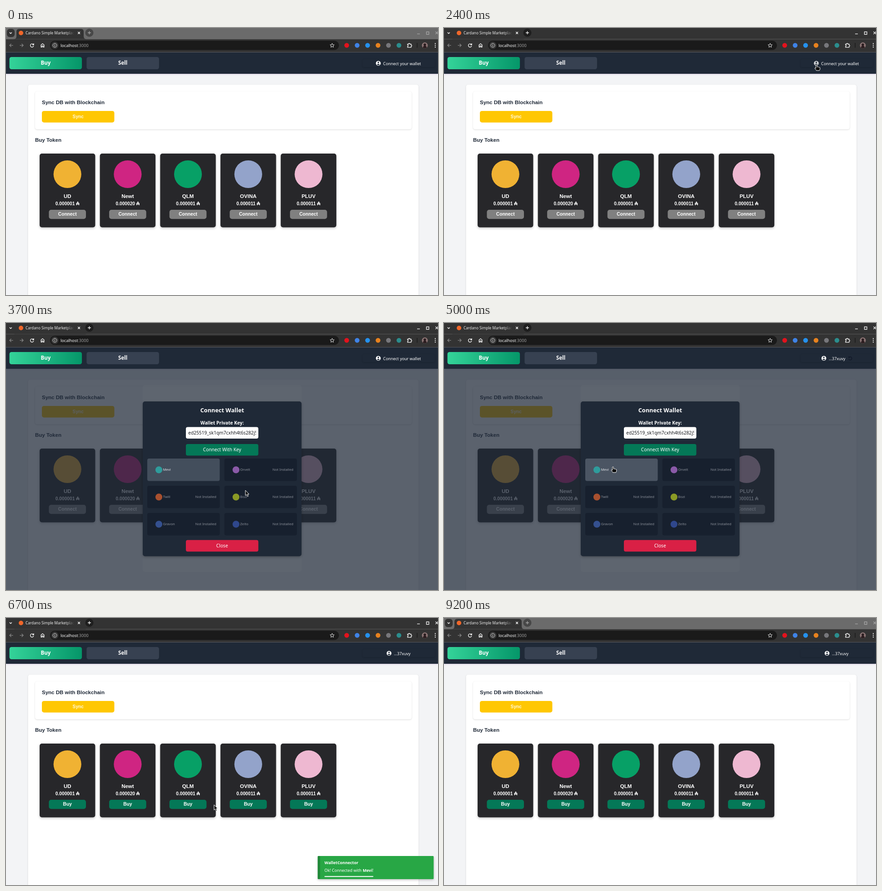
An HTML page that plays this animation: 951x589 px, repeating every 9.6 s.

```html
<!DOCTYPE html>
<html lang="en">
<head>
<meta charset="utf-8">
<title>Simple Marketplace</title>
<style>
  html, body { margin: 0; width: 100%; height: 100%; overflow: hidden; background: #f3f4f6; }
  svg { display: block; width: 951px; height: 589px; }
  text { white-space: pre; }
  .noto { font-family: "Noto Sans", "Open Sans", sans-serif; }
  .lib { font-family: "Liberation Sans", Arial, "DejaVu Sans", sans-serif; font-weight: 700; }
  .soft { filter: drop-shadow(0 1px 1.5px rgba(0, 0, 0, .14)); }
  .deep { filter: drop-shadow(0 2px 2.5px rgba(0, 0, 0, .24)); }
  .line { fill: none; stroke-width: 1.3; }
</style>
</head>
<body>
<svg id="stage" viewBox="0 0 951 589" xmlns="http://www.w3.org/2000/svg"></svg>
<script>
const LOOP = 9600, STEP = 100;
const WHITE = '#fff', NAVY = '#1f2937', GREEN = '#047857';

// ---- drawing helpers ----
const rect = (x, y, w, h, fill, r = 0, extra = '') =>
  `<rect x="${x}" y="${y}" width="${w}" height="${h}" rx="${r}" fill="${fill}" ${extra}/>`;
const disc = (x, y, r, fill, extra = '') =>
  `<circle cx="${x}" cy="${y}" r="${r}" fill="${fill}" ${extra}/>`;
const line = (d, color = WHITE, extra = '') =>
  `<path class="line" d="${d}" stroke="${color}" ${extra}/>`;
const group = (id, body, extra = '') => `<g id="${id}" ${extra}>${body}</g>`;

// y is the middle of the capital letters
const text = (str, x, y, size, { font = 'noto', weight = 400, fill = WHITE, at = 'middle', extra = '' } = {}) =>
  `<text class="${font}" x="${x}" y="${(y + size * .36).toFixed(2)}" font-size="${size}" fill="${fill}"
    ${font === 'noto' ? `font-weight="${weight}"` : ''} text-anchor="${at}" ${extra}>${str}</text>`;
const lib = (str, x, y, size, fill = WHITE, at = 'middle') => text(str, x, y, size, { font: 'lib', fill, at });
const button = (label, x, y, w, h, fill, weight = 400) =>
  rect(x, y, w, h, fill, 4) + text(label, x + w / 2, y + h / 2, 10.2, { weight });

// ---- browser frame ----
function strip(id, { bg, tab, knob, plus, ink }) {
  return group(id,
    rect(0, 0, 951, 24.5, bg) +
    `<path d="M17 24.5Q23 24.5 23 18V8Q23 2 29 2H165Q171 2 171 8V18Q171 24.5 177 24.5Z" fill="${tab}"/>` +
    rect(2, 2, 17, 18, knob, 6) +
    line('M7.8 9.8L10.3 12.3L12.8 9.8', WHITE) +
    disc(183.5, 10.5, 9, plus) +
    line('M180 10.5H187M183.5 7V14', ink) +
    line('M905 13H911', ink) +
    line('M925.5 8.5H931V14H925.5Z', ink) +
    line('M945.5 8L951 13.5M951 8L945.5 13.5', ink));
}

function browser() {
  const marks = [[750, '#e3121d'], [773, '#3f83e6'], [796, '#2591ee'], [819, '#e8821e'], [842, '#77777b'], [865, '#2b8d8d']];
  return strip('idle', { bg: '#6b6b6b', tab: '#333', knob: '#333', plus: '#474747', ink: '#a5a5a5' }) +
    strip('focus', { bg: '#333', tab: '#333', knob: '#333', plus: '#1e1e1e', ink: '#f2f2f2' }) +
    disc(33, 11, 5, '#f0672a') +
    text('Cardano Simple Marketplace', 43, 11, 8.25, { fill: 'url(#fade)', at: 'start' }) +
    line('M158.3 8.5L163 13.2M163 8.5L158.3 13.2') +
    rect(0, 24.4, 951, 29, '#333') +
    rect(97, 28, 636, 20.5, '#1a1a1a', 10.25) +
    line('M15.5 38.3H8M11.5 34.8L8 38.3L11.5 41.8', '#858585') +
    line('M30.5 38.3H38M34.5 34.8L38 38.3L34.5 41.8', '#858585') +
    line('M60.2 36.2A3.7 3.7 0 1 0 60.9 39.4M61 34V37H58') +
    line('M77.2 42V37.3L80.5 34.6L83.8 37.3V42H81.6V39.4H79.4V42Z') +
    disc(107.5, 38.3, 8, '#383838') +
    line('M107.5 34A4.3 4.3 0 1 0 107.51 34M107.5 37.6V40.7M107.5 35.6V36.7', '#e6e6e6', 'style="stroke-width:1"') +
    text('localhost<tspan fill="#a0a0a0">:3000</tspan>', 120, 38.3, 9.1, { at: 'start' }) +
    line('M718 33.8L719.3 36.9L722.6 37.1L720.1 39.3L720.9 42.5L718 40.8L715.1 42.5L715.9 39.3L713.4 37.1L716.7 36.9Z', '#e6e6e6', 'style="stroke-width:1"') +
    marks.map(([x, c]) => disc(x, 38.3, 5.2, c)).join('') +
    line('M884 35.5H886.3A1.5 1.5 0 0 1 889.3 35.5H891.8V37.6A1.5 1.5 0 0 1 891.8 40.6V42.7H884V40.6A1.5 1.5 0 0 0 884 37.6Z') +
    rect(904.6, 33, 1, 10.5, '#111') +
    disc(922, 38.3, 6.5, '#8b7474') +
    `<path d="M918 43.4Q918 40 920.5 39.3A2.9 2.9 0 1 1 923.5 39.3Q926 40 926 43.4Q922 46 918 43.4Z" fill="#2b1d20"/>` +
    [34.4, 38.3, 42.2].map(y => disc(945, y, 1.1, WHITE)).join('');
}

// ---- page ----
function card([name, price, color], i) {
  const x = 74 + i * 132.7, mid = x + 61.2;
  const action = (cls, label, fill) =>
    `<g class="${cls}">${rect(x + 20.4, 401, 81.6, 20.2, fill, 5)}${lib(label, mid, 410.7, 10.2)}</g>`;
  return rect(x, 277, 122.4, 162.8, '#27272a', 5, 'class="deep"') +
    disc(mid, 322.5, 30.6, color) +
    lib(name, mid, 371.2, 11.5) +
    lib(price + ' ₳', mid, 387.5, 10.2) +
    action('before', 'Connect', '#808080') +
    action('after', 'Buy', GREEN);
}

function page() {
  const tokens = [
    ['UD', '0.000001', '#f0b233'],
    ['Newt', '0.000020', '#cf2582'],
    ['QLM', '0.000001', '#07a066'],
    ['OVINA', '0.000011', '#93a3ca'],
    ['PLUV', '0.000011', '#eeb8d1'],
  ];
  return rect(0, 53, 951, 536, '#f3f4f6') +
    rect(48.5, 125, 859.7, 480, WHITE, 5, 'class="soft"') +
    rect(64, 140, 829, 83.6, WHITE, 5, 'class="soft"') +
    lib('Sync DB with Blockchain', 79, 163.5, 11.5, NAVY, 'start') +
    rect(79, 183, 159.5, 25.4, '#ffc702', 4.5) +
    lib('Sync', 158.8, 195.5, 10.2, '#fff8dc') +
    lib('Buy Token', 64, 247, 11.5, NAVY, 'start') +
    tokens.map(card).join('');
}

const person = x => disc(x, 77.8, 5.3, WHITE) + disc(x, 76, 1.7, NAVY) +
  `<path d="M${x - 3.2} 80.6Q${x} 77.6 ${x + 3.2} 80.6Q${x} 83.6 ${x - 3.2} 80.6Z" fill="${NAVY}"/>`;

function account(id, x, label, tail = '') {
  return group(id, `<g class="person">${person(x)}</g>` +
    text(label, x + 10.7, 78.6, 8.925, { weight: 500, at: 'start' }) + tail);
}

function nav() {
  return rect(0, 53.4, 951, 47.6, NAVY, 0, 'style="filter:drop-shadow(0 1px 1.5px rgba(110,60,140,.25))"') +
    rect(7.6, 64, 159.5, 27, 'url(#mint)', 4.5) +
    text('Buy', 87.4, 77.3, 11.5, { weight: 600 }) +
    rect(177.4, 64, 159.5, 27, '#374151', 4.5) +
    text('Sell', 257.2, 77.3, 11.5, { weight: 600 }) +
    rect(785, 69, 159, 17.5, NAVY, 4, 'class="soft"') +
    account('guest', 819.6, 'Connect your wallet') +
    account('joining', 836.2, '...37xuvy', line('M892.3 75A3.6 3.6 0 1 1 890.8 79.5M891 73.5V76.2H893.6', '#111827')) +
    account('member', 843.2, '...37xuvy');
}

// ---- dialogs ----
function picker() {
  const wallets = [
    ['Mevi', '#2f9c9c'], ['Orvelt', '#8a5aa8'], ['Twill', '#a8502f'],
    ['Bozi', '#8a9a25'], ['Gravon', '#34508f'], ['Zelto', '#2f478c'],
  ];
  const tile = ([name, color], i) => {
    const x = i % 2 ? 480.8 : 311, y = 299 + (i >> 1) * 60;
    return rect(x, y, 159.5, 49.6, i ? '#17202e' : '#434e5c', 4, i ? '' : 'id="first"') +
      disc(x + 25.5, y + 24.8, 7.6, color) +
      text(name, x + 34.7, y + 24.6, 7.65, { at: 'start', fill: i ? '#8b909a' : '#e3e6ea' }) +
      (i ? text('Not Installed', x + 152, y + 24.6, 7.65, { at: 'end', fill: '#8b909a' }) : '');
  };
  return group('picker',
    rect(301, 137, 350, 412, 'rgba(255,255,255,.02)', 5, 'class="soft"') +
    rect(301, 173, 349.6, 341.4, NAVY, 5, 'class="deep"') +
    text('Connect Wallet', 475.8, 192.4, 12.75, { weight: 700 }) +
    text('Wallet Private Key:', 475.8, 220, 10.2, { weight: 700 }) +
    rect(396, 229.5, 159.5, 25.5, WHITE, 4) +
    text('ed25519_sk1qm7cxhh4t6s282j5vw', 401.2, 242.3, 10.2, { fill: '#16181d', at: 'start', extra: 'clip-path="url(#field)"' }) +
    button('Connect With Key', 396, 267, 159.5, 25.6, GREEN, 500) +
    wallets.map(tile).join('') +
    button('Close', 396, 478.8, 159.5, 25.4, '#d92045'));
}

function menu() {
  const rows = [['View Balance', 475.8], ['Api Key', 475.8], ['Disconnect Wallet', 468]];
  return group('menu',
    rect(386, 225, 180, 205, 'rgba(255,255,255,.02)', 5, 'class="soft"') +
    rect(386, 240, 179.6, 190, NAVY, 5, 'class="deep"') +
    text('YOUR WALLET [mevi]', 475.8, 260, 12.75, { weight: 700 }) +
    rows.map(([label, x], i) => rect(396, 273.5 + i * 40, 159.5, 30, '#2d3748', 4) +
      text(label, x, 288.5 + i * 40.2, 10.2, { weight: 700 })).join('') +
    line('M519 365V363.5L527 361.3L528.5 362.5V369.5H524.5M520.5 364.6H528.5M525.5 366.8H528', WHITE, 'style="stroke-width:1"') +
    line('M519.5 366.8A2.7 2.7 0 1 0 519.51 366.8M518 369.5H521', WHITE, 'style="stroke-width:1"') +
    rect(396, 394, 159.5, 25.5, '#d92045', 4, 'id="close"') +
    text('Close', 475.8, 406.8, 10.2));
}

function toast() {
  return `<svg id="toast" x="680" width="271" viewBox="0 0 271 61" preserveAspectRatio="xMidYMin slice">` +
    rect(6.4, 0, 255, 51, '#28a745', 1.5, 'class="deep"') +
    rect(6.4, 0, 5, 51, '#1f8838', 1.5) +
    text('WalletConnector', 21, 14.7, 8.925, { weight: 700, at: 'start' }) +
    text('Ok! Connected with <tspan font-weight="700">Mevi</tspan>!', 21, 31.6, 8.925, { at: 'start' }) +
    rect(21, 44.3, 230, 2, WHITE, 1, 'id="bar"') + '</svg>';
}

const cursor = () => group('cursor',
  group('arrow', '<path d="M0 0V11.6L2.7 9.3L4.5 13.7L6.5 12.8L4.7 8.6H8Z"/>') +
  group('hand', '<path d="M-1.3 .9Q0-.7 1.3 .9V5Q2.5 4.2 3.5 5.2Q4.8 4.5 5.7 5.6Q7.6 5.2 7.8 7V9.2Q7.6 11 6.4 12.8H-.2Q-1.4 10.8-3.6 8.6Q-4.2 7-2.7 6.9L-1.3 8Z"/>'),
  'fill="#0b0b0b" stroke="#fff" stroke-width="1" stroke-linejoin="round"');

const defs = `<defs>
  <linearGradient id="mint"><stop stop-color="#34d399"/><stop offset="1" stop-color="#059669"/></linearGradient>
  <linearGradient id="fade" gradientUnits="userSpaceOnUse" x1="132" x2="150" y1="0" y2="0">
    <stop stop-color="#eee"/><stop offset="1" stop-color="#eee" stop-opacity="0"/></linearGradient>
  <clipPath id="field"><rect x="401" y="229" width="149.5" height="26"/></clipPath>
</defs>`;

const stage = document.getElementById('stage');
stage.innerHTML = defs + page() + nav() + browser() +
  rect(0, 101, 951, 488, NAVY, 0, 'id="veil" opacity=".73"') + picker() + menu() + toast() + cursor();

// ---- motion ----
const PATH = [ // time, x, y
  [800, 41, 15], [1000, 105, 135], [1200, 215, 205], [1400, 400, 217], [1600, 650, 165], [1700, 778, 115],
  [1900, 810, 92], [2200, 820, 81], [2800, 820, 81], [2900, 790, 110], [3100, 640, 245], [3300, 450, 315],
  [3500, 440, 385], [3700, 527, 369], [3800, 555, 376], [4000, 595, 430], [4200, 480, 448], [4400, 380, 420],
  [4600, 372, 317], [5100, 372, 317], [5300, 410, 365], [5500, 452, 410], [5700, 456.5, 419.5],
  [5900, 456.5, 419.5], [6100, 458, 412], [6700, 458, 412], [6900, 430, 400], [7200, 270, 385],
  [7400, 150, 300], [7600, 112, 120], [7700, 110, 30], [7900, 76, 1],
];
const within = (t, a, b) => t >= a && t < b;
const ramp = (t, a, b) => Math.min(1, Math.max(0, (t - a) / (b - a)));

function place(t) {
  const i = Math.max(1, PATH.findIndex(p => p[0] >= t));
  const [t0, x0, y0] = PATH[i - 1], [t1, x1, y1] = PATH[i];
  const k = ramp(t, t0, t1);
  return [x0 + (x1 - x0) * k, y0 + (y1 - y0) * k];
}

const el = id => document.getElementById(id);
const show = (id, on) => { el(id).style.display = on ? '' : 'none'; };
const showAll = (cls, on) => document.querySelectorAll('.' + cls).forEach(n => { n.style.display = on ? '' : 'none'; });

function draw(t) {
  const focused = within(t, 2300, 9200), joined = t >= 5100;
  const choosing = within(t, 2500, 5100), managing = within(t, 5100, 6000);
  show('focus', focused);
  show('idle', !focused);
  show('guest', t < 4800);
  show('joining', within(t, 4800, 5100));
  show('member', joined);
  showAll('before', !joined);
  showAll('after', joined);
  show('veil', choosing || managing);
  show('picker', choosing);
  show('menu', managing);
  document.querySelector('#guest .person').setAttribute('opacity', within(t, 2200, 2500) ? .8 : 1);
  el('first').setAttribute('fill', t >= 4800 ? '#4b5563' : '#434e5c');
  el('close').setAttribute('fill', t >= 5500 ? '#9f1933' : '#d92045');

  const height = 61 * (ramp(t, 5000, 5500) - ramp(t, 8100, 8750));
  show('toast', height > .5);
  if (height > .5) {
    const box = el('toast');
    box.setAttribute('y', 586 - height);
    box.setAttribute('height', height);
    box.setAttribute('viewBox', `0 0 271 ${height}`);
    el('bar').setAttribute('width', 230 * (1 - ramp(t, 5110, 8100)));
  }

  const visible = within(t, 800, 8000);
  show('cursor', visible);
  if (visible) {
    const hand = within(t, 2200, 2500) || within(t, 4600, 5100) || within(t, 5500, 6000);
    show('hand', hand);
    show('arrow', !hand);
    el('cursor').setAttribute('transform', `translate(${place(Math.min(t, 7900)).join(' ')})`);
  }
}

let last = -1;
function tick() {
  const t = Math.floor(performance.now() % LOOP / STEP) * STEP;
  if (t !== last) draw(last = t);
  requestAnimationFrame(tick);
}
tick();
</script>
</body>
</html>
```
